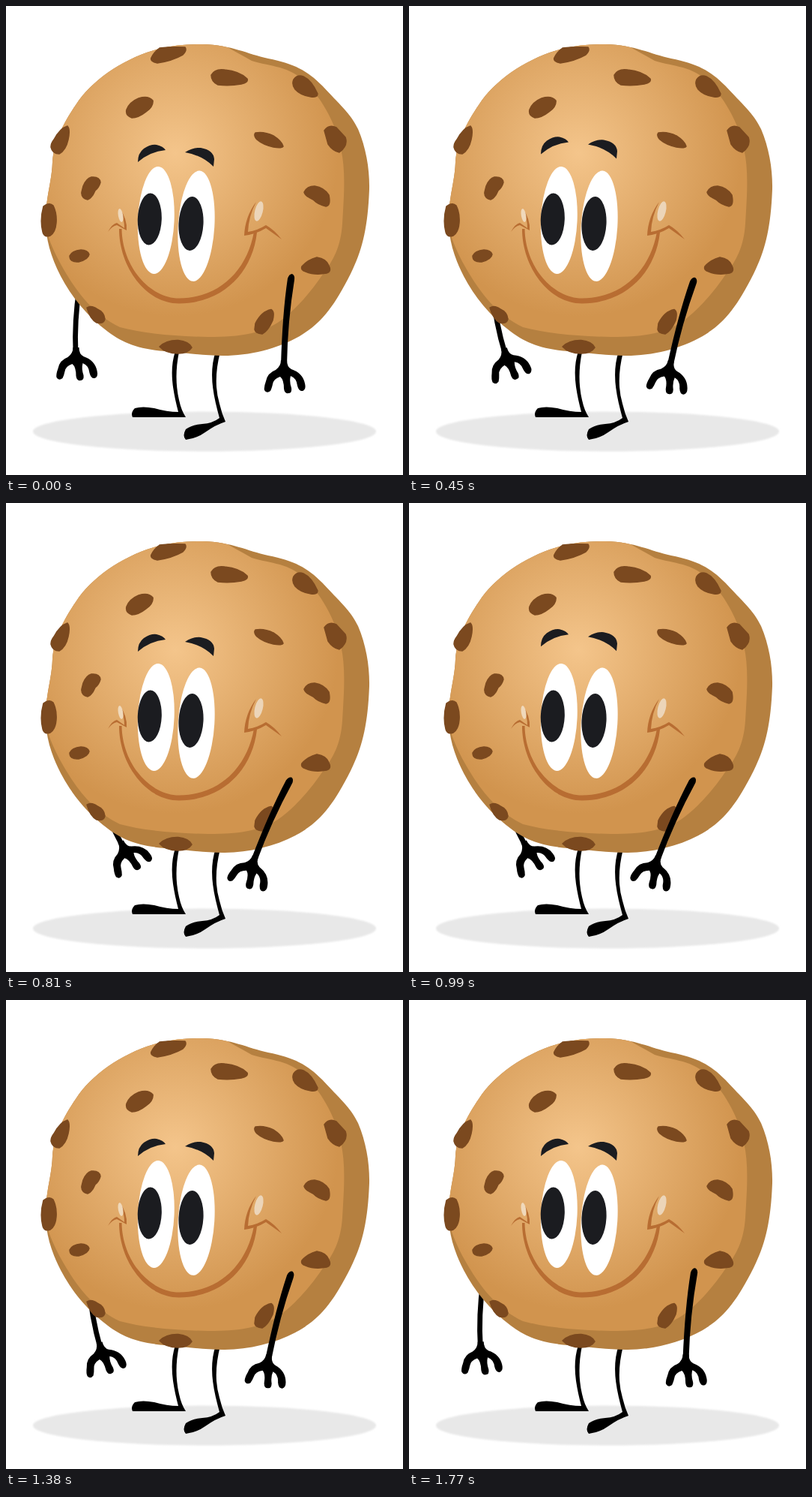
An HTML page that plays this animation: 530 by 625 pixels, repeating every 1.8 s.

```html
<!DOCTYPE html>
<html lang="en">
<head>
<meta charset="utf-8">
<title>Cookie</title>
<style>
html, body { margin: 0; width: 100%; height: 100%; overflow: hidden; background: #fff; }
svg { display: block; width: 100%; height: 100%; }
</style>
</head>
<body>
<svg viewBox="0 0 530 625" xmlns="http://www.w3.org/2000/svg">
  <defs>
    <radialGradient id="dough" gradientUnits="userSpaceOnUse" cx="226" cy="196" r="218">
      <stop offset="0" stop-color="#f4c58b"/>
      <stop offset="1" stop-color="#d1944e"/>
    </radialGradient>
    <filter id="soft"><feGaussianBlur stdDeviation="0.9"/></filter>
    <clipPath id="outline"><use href="#body"/></clipPath>
    <path id="hand" d="M-4 -8 Q-4 0 -11 5 Q-22 9 -24 20 Q-27 28 -26 32 Q-23 37 -18 33 Q-16 29 -15 24 Q-14 17 -5 14 Q0 18 0 30 Q1 37 6 36 Q11 36 10 29 Q7 20 9 13 Q17 16 18 26 Q20 34 25 33 Q30 31 28 23 Q25 9 10 4 Q4 1 4 -8Z"/>
  </defs>

  <ellipse cx="265" cy="567" rx="229" ry="26.5" fill="#e8e8e8" filter="url(#soft)"/>

  <g id="leftArm">
    <path d="M98 375 Q91 420 93 462" fill="none" stroke="#000" stroke-width="6.8"/>
    <use href="#hand" x="93.500" y="463"/>
  </g>

  <path d="M226 460 L231 461 Q224 495 231 525 Q234 539 240 548 L169 548 Q166 542 172 536 Q182 533 198 536 Q215 541 230 541 C222 510 218 485 226 460Z"/>
  <path d="M280 460 L286 461 Q276 500 285 530 Q288 543 293 554 Q280 558 266 568 Q255 576 240 578 Q235 573 240 564 Q248 558 262 557 Q276 556 285 549 C277 520 270 490 280 460Z"/>

  <path id="body" fill="#b58040" d="M262 51 C302 52 322 64 350 70 C385 77 402 86 422 106 C445 131 460 143 470 164 C481 190 485.500 218 485 244 C483 295 476 325 460 357 C440 396 424 421 392 440 C362 457 325 466 290 466 C260 466 240 462 212 460 C176 457 156 449 136 434 C108 413 87 387 73 360 C59 333 52.500 308 53 284 C53 255 61 235 62 208 C64 178 79 152 97 126 C121 94 160 69 204 57 Q232 50 262 51Z"/>
  <path clip-path="url(#outline)" fill="url(#dough)" d="M284 49 C298 56 312 64 328 73 C345 79 377 80 394 97 C420 119 440 155 447 190 C454 220 451 255 449 290 C447 322 436 340 424 356 C405 384 388 402 372 415 C346 437 312 441 270 441 C220 440 182 436 152 428 C118 412 95 382 77 351 C61 323 51 300 50 270 L50 40Z"/>

  <path fill="#7b491f" stroke="#7b491f" stroke-width="1.500" stroke-linejoin="round" d="M205 56 Q222 54 239 55 Q242 59 236 65 Q222 73 202 76 Q192 74 194 69 Q197 62 205 56Z
    M274 92 Q279 83 292 85 Q312 87 322 97 Q324 102 314 104 Q298 107 283 105 Q274 101 274 92Z
    M384 98 Q389 91 397 94 Q408 99 416 117 Q416 122 407 121 Q393 119 386 111 Q381 104 384 98Z
    M425 166 Q431 157 441 162 L453 175 Q457 186 445 195 Q436 193 430 184Z
    M333 169 Q345 167 357 173 Q368 180 370 187 Q368 190 357 188 Q343 185 335 178 Q330 172 333 169Z
    M161 138 Q165 128 177 123 Q190 119 196 126 Q197 134 187 141 Q177 149 168 149 Q159 146 161 138Z
    M64 178 Q72 163 82 160 Q86 164 83 178 Q80 192 71 197 Q62 197 60 188 Q60 183 64 178Z
    M103 240 Q107 230 114 228 Q125 227 126 235 Q124 242 119 246 Q115 256 109 258 Q100 256 101 248Z
    M50 267 Q58 261 63 266 Q68 276 67 289 Q66 302 59 306 Q51 309 49 301 Q45 285 50 267Z
    M85 333 Q88 326 100 325 Q109 325 111 331 Q110 338 97 341 Q85 342 85 333Z
    M108 402 Q114 398 122 404 Q131 408 132 417 Q131 424 121 422 Q112 417 108 402Z
    M205 454 Q214 445 230 445.500 Q244 447 248 455 Q243 463 230 463 Q213 463 205 454Z
    M333 423 Q341 407 354 404.500 Q359 407 356 419 Q350 433 342 437 Q333 436 332 431Z
    M395 347 Q403 338 415 335 Q428 337 431 346 Q435 354 428 356 Q412 359 400 354 Q393 352 395 347Z
    M398 248 Q402 240 412 240 Q425 242 431 252 Q434 266 427 267 Q417 265 410 258 Q399 253 398 248Z"/>

  <g fill="#b86d32">
    <path d="M151 297 C151 348 187 396.500 231 396.500 C290 396 329 355 335 302 L331 301 C322 352 285 389.500 231 389.500 C192 389.500 155 347 154.500 297Z"/>
    <path d="M136 301 Q142 290 148 289 L158 296 Q158 283 152 270 Q162 284 161 299 L148 292 Q142 293 136 301Z"/>
    <path d="M334 261 Q319 281 318 306 Q334 304 347 296 L368 311 Q358 298 347 292 Q336 299 323 301 Q324 280 334 261Z"/>
  </g>
  <ellipse cx="153" cy="279" rx="3.2" ry="9" transform="rotate(-10 153 279)" fill="#f0d9bb"/>
  <ellipse cx="337.500" cy="273.500" rx="5.3" ry="13.500" transform="rotate(14 337.500 273.500)" fill="#ecd5b9"/>

  <g fill="#fff">
    <ellipse cx="200.300" cy="285.500" rx="24.300" ry="71.500" transform="rotate(2.500 200.300 285.500)"/>
    <ellipse cx="254" cy="293.200" rx="24.300" ry="73.800" transform="rotate(3.500 254 293.200)"/>
  </g>
  <g fill="#1b1c20">
    <ellipse cx="191.800" cy="284" rx="16" ry="34.500" transform="rotate(2 191.800 284)"/>
    <ellipse cx="247" cy="290" rx="16.500" ry="36" transform="rotate(3 247 290)"/>
    <path id="brows" d="M176 208 Q176 196 184 190 Q193 184 201 185 Q210 187 213 192 Q192 194 176 208Z M239 195 Q250 188 260 189 Q277 192 278 204 L277 214 Q262 199 239 195Z"/>
  </g>

  <g id="rightArm">
    <path d="M376 363 Q378 357 382 357 Q386 359 385 365 Q376 420 375 478 L367 478 Q369 410 376 363Z"/>
    <use href="#hand" x="371" y="480"/>
  </g>
</svg>
<script>
const LOOP = 1800, STEP = 30;
const BROW_LIFT = 18.5;
const BROW_KEYS = [[0, 0], [315, 1], [630, 0], [960, 1], [1290, 0], [LOOP, 0]];
const part = id => document.getElementById(id);
const leftArm = part('leftArm'), rightArm = part('rightArm'), brows = part('brows');

function interpolate(keys, t) {
  const i = keys.findIndex(([time]) => time > t);
  const [t0, v0] = keys[i - 1], [t1, v1] = keys[i];
  return v0 + (v1 - v0) * (t - t0) / (t1 - t0);
}

function draw(t) {
  const swing = 1 - Math.abs(t / (LOOP / 2) - 1);
  leftArm.setAttribute('transform', `rotate(${-28.7 * swing} 115 323)`);
  rightArm.setAttribute('transform', `rotate(${21.5 * swing} 356 360)`);
  brows.setAttribute('transform', `translate(0 ${-BROW_LIFT * interpolate(BROW_KEYS, t)})`);
}

let start;
function tick(now) {
  start ??= now;
  draw(Math.floor(((now - start) % LOOP) / STEP) * STEP);
  requestAnimationFrame(tick);
}
draw(0);
requestAnimationFrame(tick);
</script>
</body>
</html>
```
